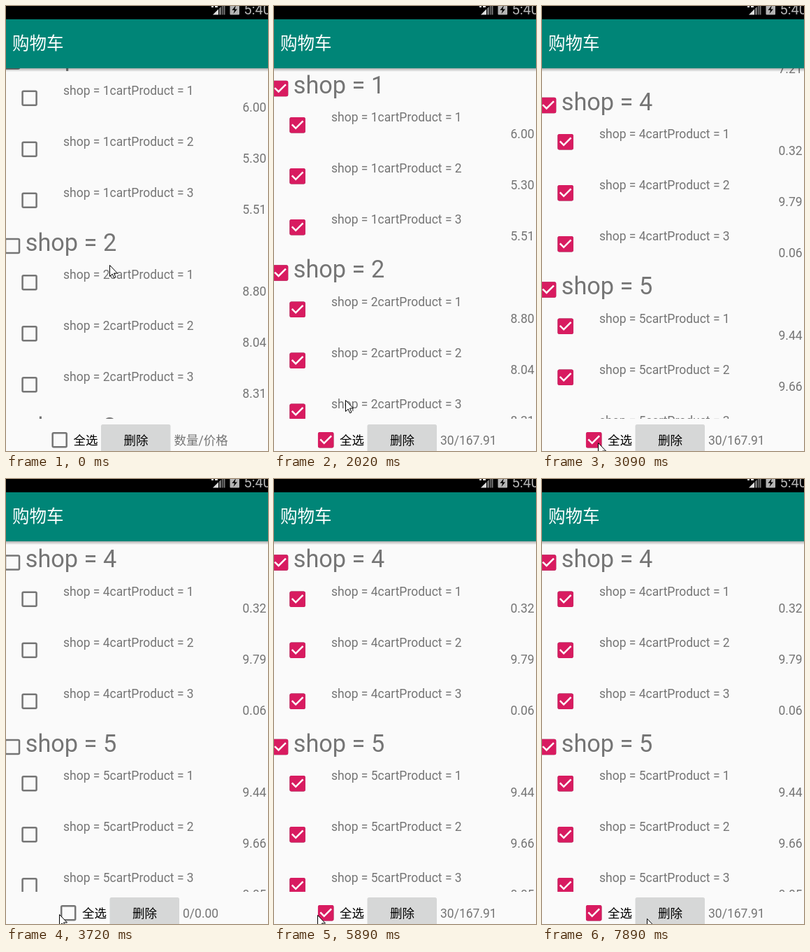
An HTML page that plays this animation: 375x636 px, repeating every 8000 ms.

```html
<!DOCTYPE html>
<html lang="zh-CN">
<head>
<meta charset="utf-8">
<title>购物车</title>
<style>
  html, body { margin: 0; width: 375px; height: 636px; overflow: hidden; background: #fafafa; }
  svg { display: block; }
  text { font: 17.5px Roboto, "Noto Sans CJK SC", "Noto Sans CJK", sans-serif; fill: #757575; white-space: pre; }
  .shop { font-size: 34.3px; }
  .title { font-size: 24.5px; font-weight: 500; fill: #fff; }
  .clock { font-size: 20px; fill: #b4b4b4; }
  .dark { fill: #000; font-weight: 500; }
</style>
</head>
<body>
<svg width="375" height="636" viewBox="0 0 375 636">
  <defs>
    <g id="box">
      <rect x="-10" y="-10" width="20" height="20" rx="1.5" fill="none" stroke="#757575" stroke-width="2.5"/>
      <g id="tick">
        <rect x="-11.25" y="-11.25" width="22.5" height="22.5" rx="2.5" fill="#d81b60"/>
        <path d="M-7.9 -.9L-2.5 4.5L7.9 -5.9" fill="none" stroke="#fff" stroke-width="2.5"/>
      </g>
    </g>
    <clipPath id="view"><rect y="89" width="375" height="501"/></clipPath>
    <linearGradient id="shade" x2="0" y2="1">
      <stop stop-color="#000" stop-opacity=".3"/>
      <stop offset="1" stop-color="#000" stop-opacity="0"/>
    </linearGradient>
  </defs>

  <g clip-path="url(#view)"><g id="list"></g></g>

  <rect y="89" width="375" height="5" fill="url(#shade)"/>
  <rect y="19" width="375" height="70" fill="#008577"/>
  <text class="title" x="9" y="62">购物车</text>

  <rect width="375" height="19"/>
  <path d="M294 0h3v2h-3zM299 0h4v2h-4zM296 12.5l8-8v8z" fill="#ddd"/>
  <path d="M305 3.5l3-2.5v11.5h-3zM309 0h1.5v12.5h-1.5zM311.5 0h2v12.5h-2z" fill="#777"/>
  <rect x="320.5" y="-2" width="13.5" height="14.5" rx="1" fill="#b4b4b4"/>
  <path d="M329 -1l-5.5 7h3.5l-1.5 5l5.5 -6.5h-3.5z"/>
  <text class="clock" x="340.5" y="12">5:40</text>

  <g id="footer">
    <use href="#box" x="76.7" y="620.3"/>
    <text class="dark" x="96.5" y="627">全选</text>
    <rect x="136" y="598" width="99.5" height="42" rx="2.5" fill="#d6d7d7"/>
    <text class="dark" x="168.5" y="627">删除</text>
    <text id="total" x="240.5" y="627"></text>
  </g>

  <path id="cursor" d="M.5 .5v16l3.7 -3.5l2.5 5.7l2.3 -1l-2.5 -5.7h5z" fill="#fff" stroke="#000"/>
</svg>
<script>
const LOOP = 8000, FRAME = 131, ROW = 73, GROUP = 263.5;
const $ = id => document.getElementById(id);
const prices = '6.00 5.30 5.51 8.80 8.04 8.31 7.69 6.99 7.21 0.32 9.79 0.06 9.44 9.66 0.05'.split(' ');

// Vertical positions are measured from the first shop's checkbox.
$('list').innerHTML = prices.map((price, i) => {
  const shop = Math.floor(i / 3) + 1, item = i % 3 + 1;
  const top = (shop - 1) * GROUP, y = top + 52.3 + (item - 1) * ROW;
  const head = `<use href="#box" x="9" y="${top}"/><text class="shop" x="27.7" y="${top + 6.7}">shop = ${shop}</text>`;
  return (item === 1 ? head : '') + `<use href="#box" x="33.6" y="${y}"/>
    <text x="82" y="${y - 5}">shop = ${shop}cartProduct = ${item}</text>
    <text x="338.5" y="${y + 19}">${price}</text>`;
}).join('');

// Each move: begin, end, destination.
const scrolls = [[150, 940, -274], [1090, 1500, 118], [2300, 3090, -648.5], [3210, 3360, -671]];
const moves = [
  [150, 940, 140, 640], [1500, 1630, 76, 620], [1890, 2020, 102, 563],
  [2300, 2700, 148, 250], [2700, 3090, 80, 624], [3210, 3360, 76, 622],
  [4850, 5300, 266, 622], [5430, 5890, 62, 623], [7340, 7890, 150, 628]
];
const clicks = [1740, 3480, 4290, 6290, 7200];

// Progress from 0 to 1 in even screen updates, the first one at a, the last at b.
function ramp(t, a, b) {
  const n = Math.round((b - a) / FRAME);
  return t < a ? 0 : t >= b ? 1 : (Math.floor((t - a) / (b - a) * n) + 1) / (n + 1);
}

const follow = (path, from, t) => path.reduce(
  (pos, [a, b, ...to]) => pos.map((v, i) => v + (to[i] - v) * ramp(t, a, b)), from);

const place = (id, x, y) => $(id).setAttribute('transform', `translate(${x} ${y})`);

function draw(t) {
  const count = clicks.filter(k => k <= t).length;
  const checked = count % 2 === 1;
  const [label, shift] = checked ? ['30/167.91', -2.5] : count ? ['0/0.00', 12.5] : ['数量/价格', 0];

  $('tick').style.display = checked ? '' : 'none';
  $('total').textContent = label;
  place('footer', shift, 0);
  place('list', 0, follow(scrolls, [79.5], t)[0]);
  place('cursor', ...follow(moves, [148, 370], t).map(Math.round));
}

const start = performance.now();
function loop() {
  draw((performance.now() - start) % LOOP);
  requestAnimationFrame(loop);
}
loop();
</script>
</body>
</html>
```
